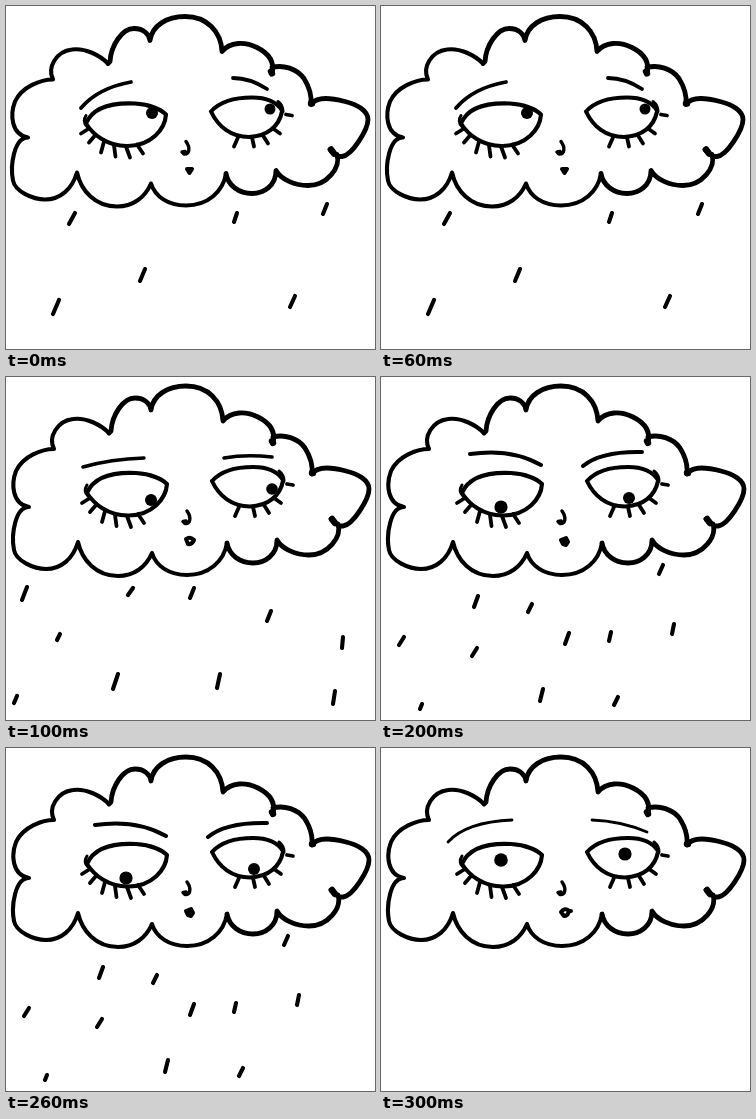
An HTML page that plays this animation: 369x343 px, repeating every 400 ms.

```html
<!DOCTYPE html>
<html lang="en">
<head>
<meta charset="utf-8">
<title>Rain cloud</title>
<style>
  html, body { margin: 0; width: 100%; height: 100%; overflow: hidden; background: #fff; }
  svg { display: block; width: 100%; height: 100%; }
</style>
</head>
<body>
<svg viewBox="0 0 369 343" fill="none" stroke="#000" stroke-linecap="round" stroke-linejoin="round">
  <g id="cloud">
    <!-- right and top outline -->
    <path stroke-width="4.8" d="M103 56 L105 54 C106 38 117 21 129 21 C139 21 144 27 145 33
      C147 18 162 9 180 9 C202 9 216 24 217 44 C225 34 240 34 252 40 C264 46 270 54 267 66
      M267 60 C278 57 292 61 299 71 C304 79 307 87 306 97 C312 88 328 91 340 94
      C352 97 363 103 363 112 C363 122 347 148 337 149 C333 149 328 146 325 142
      M332 147 C336 160 322 178 303 178 C290 178 276 172 271 163
      C271 178 259 186 247 186 C234 186 223 178 221 166"/>
    <path stroke-width="6.4" d="M266 64 L267 66 M326 142 L329 146 M306 96 L307 96"/>
    <!-- lower and left outline -->
    <path stroke-width="4.1" d="M221 166 C218 184 203 198 181 198 C163 198 150 189 146 176
      C140 190 128 199 112 199 C90 199 76 183 72 165 C67 182 55 192 40 192
      C28 192 10 184 8 173 C5 158 9 130 23 130 C6 127 5 107 10 94 C17 79 36 72 48 72
      C42 60 51 44 67 42 C80 40 95 48 103 56"/>
    <!-- eyes -->
    <path stroke-width="4.1" d="M81 116 C88 99 108 95 130 96 C145 97 156 102 161 107
      C160 122 146 138 123 138.5 C102 139 88 127 81 116
      M206 104 C215 94 230 90 247 90 C262 90 272 95 277 103
      M206 104 C213 119 226 129.5 244 129.5 C262 129 274 119 277 104"/>
    <path stroke-width="3" d="M81 108 Q77 114 82 119 M273 94 Q278 98 278 104"/>
    <!-- lashes -->
    <path stroke-width="3.8" d="M84 121 L76 126 M90 128 L84 135 M99 134 L96 145 M109 138 L110.5 149
      M121 139 L125 150 M132 137 L138 146 M233 130 L229 139 M247 130 L249 139
      M258 128 L263 136 M268 121 L275 126 M281 107 L287 108"/>
    <path stroke-width="3.4" d="M181 134 C186 141 184 147 179 146.5 L177 144.5 L180 144"/>
  </g>
  <path id="brows"/>
  <g fill="#000" stroke="none"><circle id="left"/><circle id="right"/></g>
  <path id="mouth" stroke-width="4"/>
  <path id="rain" stroke-width="4.1"/>
</svg>
<script>
const POSE_MS = 100;
const poses = [
  {
    shift: [-1, 1.5],
    left: [146, 107, 6], right: [264, 103, 5.5],
    browWidth: 3.8,
    brows: 'M75 102 Q92 82 125 76 M227 72 Q244 72 261 83',
    mouth: 'M181 163 L183.5 167 L186 163 Z',
    rain: 'M69 207 L63 218 M231 207 L228 216 M321 198 L317 208 M139 263 L134 275 M53 294 L47 308 M289 290 L284 301'
  },
  {
    shift: [0, 0],
    left: [145, 123, 6], right: [266, 112, 5.8],
    browWidth: 3.6,
    brows: 'M77 90 Q105 82 138 81 M218 81 Q240 77 266 80',
    mouth: 'M180 162 Q184 159 188 163 Q186 168 182 167 Z',
    rain: 'M21 210 L16 223 M127 211 L122 218 M188 211 L184 221 M265 234 L261 244 M54 257 L51 263 ' +
          'M337 260 L336 271 M112 297 L107 312 M214 297 L211 311 M11 319 L8 326 M329 314 L327 327'
  },
  {
    shift: [0, 0],
    left: [120, 130, 6.6], right: [248, 121, 6],
    browWidth: 4,
    brows: 'M89 77 Q130 71 160 88 M202 89 Q220 74 261 75',
    mouth: 'M180 163 L185 161 L187 165 L185 168 L182 167 Z M183 164 L185 165',
    rain: 'M97 219 L93 230 M151 227 L147 235 M282 188 L278 197 M23 260 L18 268 M188 256 L184 267 M230 255 L228 264 ' +
          'M293 247 L291 257 M96 271 L91 279 M162 312 L159 324 M237 320 L233 328 M41 327 L39 332'
  },
  {
    shift: [0, 0],
    left: [120, 112, 6.8], right: [244, 106, 6.6],
    browWidth: 2.8,
    brows: 'M67 94 Q85 74 131 72 M211 72 Q240 73 266 84',
    mouth: 'M180 164 Q184 159 188 163 Q187 168 183 168 Z M188 163 L190 163',
    rain: ''
  }
];

const part = id => document.getElementById(id);

function setPupil(id, [cx, cy, r]) {
  for (const [name, value] of Object.entries({ cx, cy, r })) part(id).setAttribute(name, value);
}

function draw(pose) {
  part('cloud').setAttribute('transform', `translate(${pose.shift})`);
  for (const id of ['brows', 'mouth', 'rain']) part(id).setAttribute('d', pose[id]);
  part('brows').setAttribute('stroke-width', pose.browWidth);
  setPupil('left', pose.left);
  setPupil('right', pose.right);
}

const start = performance.now();
function tick() {
  const elapsed = performance.now() - start;
  draw(poses[Math.floor(elapsed / POSE_MS) % poses.length]);
  requestAnimationFrame(tick);
}
tick();
</script>
</body>
</html>
```
